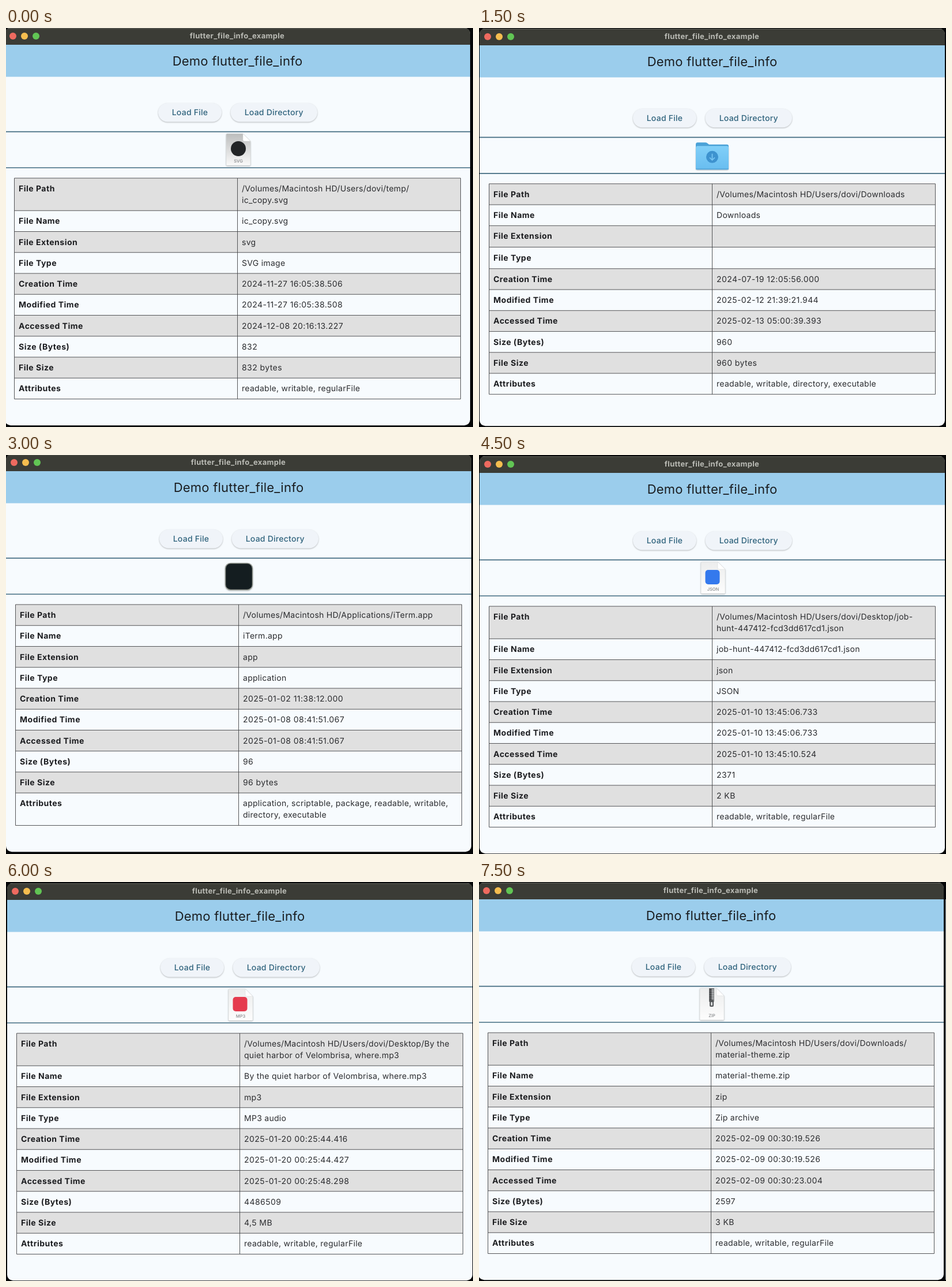
An HTML page that plays this animation: 810 px wide and 691 px high, repeating every 9 s.

```html
<!DOCTYPE html>
<html lang="en">
<head>
<meta charset="utf-8">
<title>flutter_file_info_example</title>
<style>
  html, body { margin: 0; width: 100%; height: 100%; overflow: hidden; background: #050607; }
  svg { display: block; width: 810px; height: 691px; }
  text { font: 14px Inter, Roboto, sans-serif; letter-spacing: .28px; fill: #2b2c2f; text-rendering: geometricPrecision; }
  .mid { text-anchor: middle; }
  .title { font-size: 13px; font-weight: 700; fill: #babbb5; letter-spacing: .32px; }
  .heading { font-size: 22px; fill: #1a1d20; letter-spacing: .23px; }
  .label { font-weight: 700; fill: #1c1d20; letter-spacing: .5px; }
  .number { letter-spacing: .43px; }
  .button { font-weight: 500; fill: #2e627c; letter-spacing: .25px; }
  .kind { font-size: 7.5px; font-weight: 500; fill: #85878a; letter-spacing: 0; }
  .shadow { filter: drop-shadow(0 1px 1px #0004); }
</style>
</head>
<body>
<svg id="stage" viewBox="0 0 810 691">
  <defs>
    <linearGradient id="paper" x2="0" y2="1">
      <stop stop-color="#eceded"/><stop offset="1" stop-color="#fdfdfd"/>
    </linearGradient>
    <linearGradient id="darkPaper" x2="0" y2="1">
      <stop stop-color="#bcbdbd"/><stop offset="1" stop-color="#fafafa"/>
    </linearGradient>
    <linearGradient id="folder" x2="0" y2="1">
      <stop stop-color="#81cff8"/><stop offset="1" stop-color="#68bdf0"/>
    </linearGradient>
  </defs>
</svg>
<script>
const HOLD = 1500;
const LABELS = ["File Path", "File Name", "File Extension", "File Type", "Creation Time",
  "Modified Time", "Accessed Time", "Size (Bytes)", "File Size", "Attributes"];
const HOME = "/Volumes/Macintosh HD/Users/dovi/";
const FILE_FLAGS = "readable, writable, regularFile";

const rect = (x, y, w, h, fill, more = "") =>
  `<rect x="${x}" y="${y}" width="${w}" height="${h}" fill="${fill}" ${more}/>`;
const circle = (x, y, r, fill) => `<circle cx="${x}" cy="${y}" r="${r}" fill="${fill}"/>`;
const text = (x, y, style, value) => `<text x="${x}" y="${y}" class="${style}">${value}</text>`;
const path = (d, attributes) => `<path d="${d}" ${attributes}/>`;

const page = (kind, emblem, fill = "paper") =>
  path("M383.5 183H411L424 196V236.5Q424 238 422.5 238H383.5Q382 238 382 236.5V184.5Q382 183 383.5 183Z",
    `class="shadow" fill="url(#${fill})" stroke="#d3d5d7" stroke-width=".5"`) +
  path("M411 183V193.5Q411 196 413.5 196H424Z", 'fill="#fff" stroke="#d3d5d7" stroke-width=".5"') +
  emblem + text(403, 233, "mid kind", kind);

function zipper() {
  let teeth = rect(398, 183, 9, 23, "#727476");
  for (let y = 184; y < 206; y += 3)
    teeth += rect(398.5, y, 4, 1.5, "#303234") + rect(402.5, y + 1.4, 4, 1.5, "#c6c8c9");
  return teeth + rect(399, 203, 7, 12, "#55585a", 'rx="2"') + rect(401, 207, 3, 6, "#d3d5d6", 'rx="1"');
}

const folder = () =>
  path("M373 192Q373 188.5 376 188.5H390Q392 188.5 394 190.5L396 192H427Q430 192 430 195V210H373Z", 'fill="#4ba2d8"') +
  rect(373, 194.5, 57, 41, "url(#folder)", 'rx="3" class="shadow"') +
  rect(373, 233.5, 57, 2, "#58a9db", 'rx="1"') +
  circle(401.5, 213.5, 10.5, "#3d92cf") +
  path("M401.5 208V218.5M397 214.5L401.5 219L406 214.5", 'fill="none" stroke="#76c4f2" stroke-width="1.8"');

// dx, dy place the window; drop lowers the content below the app bar.
const scenes = [
  { dx: 0, dy: 0, drop: 0, icon: page("SVG", circle(403, 209, 13, "#222426"), "darkPaper"),
    values: [HOME + "temp/\nic_copy.svg", "ic_copy.svg", "svg", "SVG image", "2024-11-27 16:05:38.506",
      "2024-11-27 16:05:38.508", "2024-12-08 20:16:13.227", "832", "832 bytes", FILE_FLAGS] },
  { dx: 3, dy: 1, drop: 8.8, icon: folder(),
    values: [HOME + "Downloads", "Downloads", "", "", "2024-07-19 12:05:56.000",
      "2025-02-12 21:39:21.944", "2025-02-13 05:00:39.393", "960", "960 bytes",
      "readable, writable, directory, executable"] },
  { dx: 2, dy: -1, drop: 0, icon: rect(378.5, 188.5, 47, 46, "#141d20", 'rx="9" stroke="#92978f" stroke-width="1.5" class="shadow"'),
    values: ["/Volumes/Macintosh HD/Applications/iTerm.app", "iTerm.app", "app", "application",
      "2025-01-02 11:38:12.000", "2025-01-08 08:41:51.067", "2025-01-08 08:41:51.067", "96", "96 bytes",
      "application, scriptable, package, readable, writable,\ndirectory, executable"] },
  { dx: 3, dy: 2, drop: 0, icon: page("JSON", rect(389.5, 197, 25, 25, "#3479ed", 'rx="5"')),
    values: [HOME + "Desktop/job-\nhunt-447412-fcd3dd617cd1.json", "job-hunt-447412-fcd3dd617cd1.json", "json", "JSON",
      "2025-01-10 13:45:06.733", "2025-01-10 13:45:06.733", "2025-01-10 13:45:10.524", "2371", "2 KB", FILE_FLAGS] },
  { dx: 4, dy: 2, drop: 0, icon: page("MP3", rect(389.5, 197, 25, 25, "#e53b4e", 'rx="5"')),
    values: [HOME + "Desktop/By the\nquiet harbor of Velombrisa, where.mp3", "By the quiet harbor of Velombrisa, where.mp3", "mp3",
      "MP3 audio", "2025-01-20 00:25:44.416", "2025-01-20 00:25:44.427", "2025-01-20 00:25:48.298",
      "4486509", "4,5 MB", FILE_FLAGS] },
  { dx: 1, dy: 1, drop: 0, icon: page("ZIP", zipper()), backdrop: rect(808, 29, 1, 659, "#9a9fa3"),
    values: [HOME + "Downloads/\nmaterial-theme.zip", "material-theme.zip", "zip", "Zip archive",
      "2025-02-09 00:30:19.526", "2025-02-09 00:30:19.526", "2025-02-09 00:30:23.004", "2597", "3 KB", FILE_FLAGS] }
];

function table(values) {
  let y = 260, fills = "", words = "", lines = `M14.5 ${y}H788.5`;
  values.forEach((value, i) => {
    const parts = value.split("\n");
    const height = value ? 16.25 + 20 * parts.length : 37.25;
    const style = /^\d/.test(value) ? "number" : "";
    if (i % 2 === 0) fills += rect(14.5, y, 774, height, "#e0e0e0");
    words += text(22, y + 23, "label", LABELS[i]);
    parts.forEach((part, n) => words += text(409, y + 23 + 20 * n, style, part));
    y += height;
    lines += `M14.5 ${y}H788.5`;
  });
  lines += [14.5, 401.5, 788.5].map(x => `M${x} 260V${y}`).join("");
  return fills + path(lines, 'fill="none" stroke="#434547" stroke-width=".9"') + words;
}

const button = (x, width, label) =>
  rect(x, 130, width, 32.5, "#f0f4f9", 'rx="16.25" class="shadow"') +
  text(x + width / 2, 151, "mid button", label);

const windowFrame = () =>
  rect(-2, 0, 807, 688.3, "#f7fbfe", 'rx="10"') +
  path("M-2 29V10Q-2 0 8 0H795Q805 0 805 10V29Z", 'fill="#3b3c36"') +
  path("M3 .8H800", 'stroke="#6b6c66" stroke-width=".8"') +
  circle(12, 14, 6, "#ee6a5f") + circle(32, 14, 6, "#f5bd4f") + circle(52, 14, 6, "#61c554") +
  text(401, 18, "mid title", "flutter_file_info_example") +
  rect(-2, 29, 807, 55.5, "#9bcdec") +
  text(401.5, 65, "mid heading", "Demo flutter_file_info");

const drawScene = ({ dx, dy, drop, icon, values, backdrop = "" }) =>
  `<g class="scene" transform="translate(${dx} ${dy})">${backdrop}${windowFrame()}
    <g transform="translate(0 ${drop})">
      ${button(264, 110, "Load File")}${button(389.5, 150.5, "Load Directory")}
      ${path("M-2 179.6H805M-2 242H805", 'stroke="#426b80" stroke-width="1.7"')}
      ${icon}${table(values)}
    </g></g>`;

const stage = document.getElementById("stage");
stage.insertAdjacentHTML("beforeend", scenes.map(drawScene).join(""));
const groups = [...stage.querySelectorAll(".scene")];

function show() {
  const current = Math.floor(performance.now() / HOLD) % groups.length;
  groups.forEach((group, i) => group.style.display = i === current ? "" : "none");
  requestAnimationFrame(show);
}
show();
</script>
</body>
</html>
```
